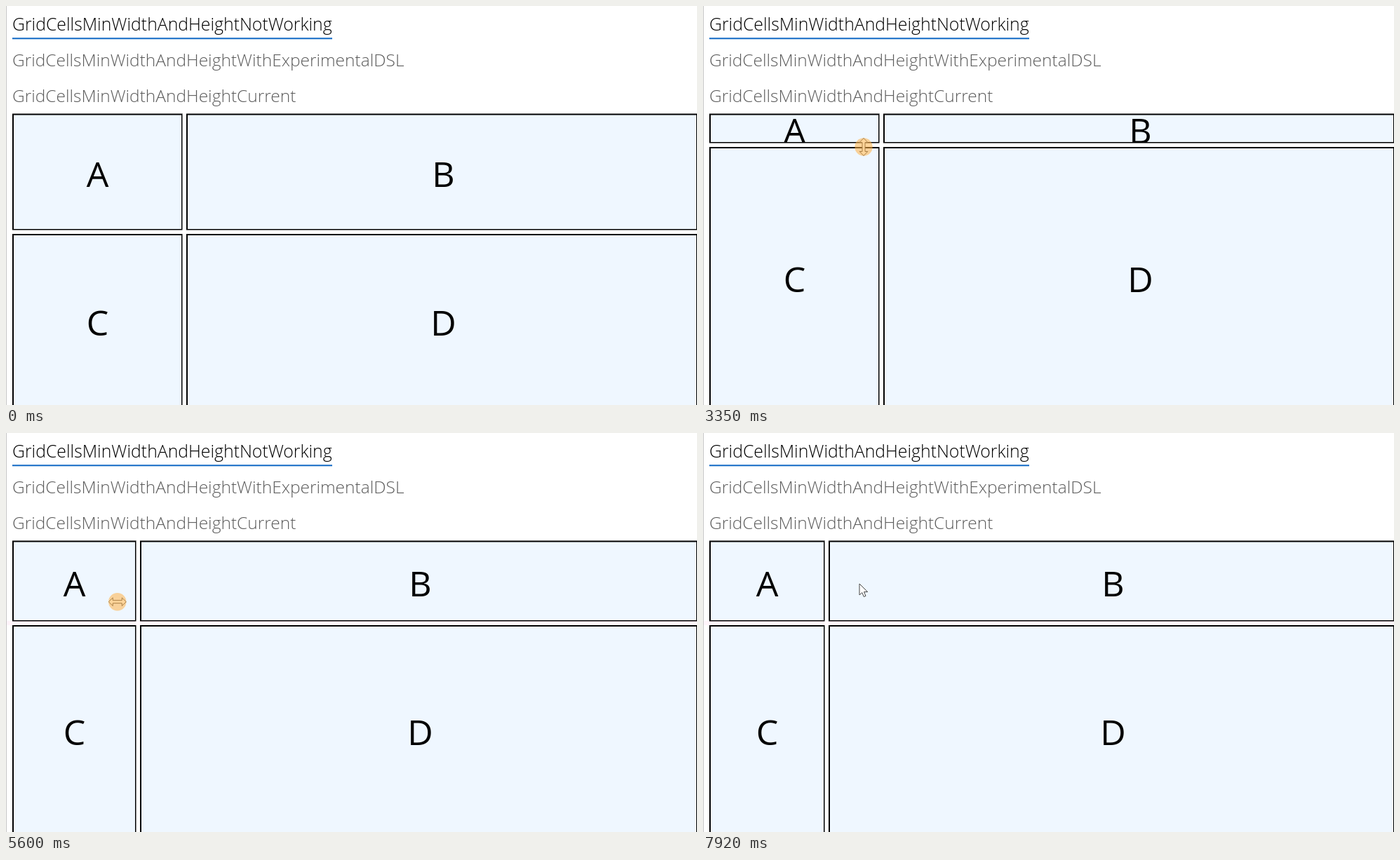
Write an HTML page that moves like this. It is 985 by 569 pixels and loops after 7.99 s.

```html
<!DOCTYPE html>
<html lang="en">
<head>
<meta charset="utf-8">
<title>Grid cells</title>
<style>
  html, body { margin: 0; width: 100%; height: 100%; overflow: hidden; background: #fff; }
  svg { display: block; font-family: "Open Sans", "Noto Sans", sans-serif; }
  .tab { font-size: 24.5px; font-weight: 300; fill: #5c5c5c; }
  .tab.on { font-size: 24.8px; fill: #000; }
  .cell rect { fill: #eff7ff; stroke: #000; stroke-width: 2; }
  .cell text { font-size: 50px; text-anchor: middle; }
  .bar { fill: #fff; fill-opacity: .5; }
  .cursor { fill: #fff; stroke: #444; stroke-linejoin: round; }
</style>
</head>
<body>
<svg width="985" height="569" viewBox="0 0 985 569">
  <defs><clipPath id="pane"><rect x="0" y="144" width="985" height="425"/></clipPath></defs>
  <text class="tab on" x="9" y="35">GridCellsMinWidthAndHeightNotWorking</text>
  <rect x="9" y="45.3" width="456" height="2" fill="#0f67c4"/>
  <text class="tab" x="9" y="86">GridCellsMinWidthAndHeightWithExperimentalDSL</text>
  <text class="tab" x="9" y="137">GridCellsMinWidthAndHeightCurrent</text>
  <g id="grid" clip-path="url(#pane)"></g>
  <rect width="1" height="569" fill="#c6c6c6"/>
  <g id="mouse">
    <path id="shape" class="cursor"/>
    <circle id="press" r="12.7" fill="#ffb347" fill-opacity=".55"/>
  </g>
</svg>
<script>
const LOOP = 7990, LAG = 70;
const LEFT = 9, TOP = 153.5, RIGHT = 986, BOTTOM = 700, GAP = 5;
const MIN_W = 36, MIN_H = 72;
const ROW_DRAG = [1970, 3950], COL_DRAG = [5250, 7655];

const ARROW = "M0 0V16L3.8 12.6L6.3 18.5L9 17.4L6.5 11.6H11.7Z";
const RESIZE = "M0-12.5L5.8-6.5H2V6.5H5.8L0 12.5L-5.8 6.5H-2V-6.5H-5.8Z";

// Eased mouse moves: from and to time, end point, sideways bow
const moves = [
  [120, 720, 252, 299],
  [720, 940, 231, 333],
  [1080, 1640, 237, 320],
  [2045, 2860, 239, 139, 6],
  [2900, 2990, 239, 133],
  [3100, 3280, 229, 201],
  [3400, 3900, 231, 274],
  [3960, 4450, 263, 236],
  [4710, 4920, 255, 236],
  [5250, 6150, -30, 250],
  [6400, 6760, 172, 268],
  [6785, 7120, -45, 262],
  [7170, 7650, 177, 236],
  [7660, 7920, 223, 215]
];

const $ = id => document.getElementById(id);
const clamp = (v, lo, hi) => Math.max(lo, Math.min(hi, v));
const within = (t, [from, to]) => t >= from && t < to;
const ease = p => p * p * (3 - 2 * p);

function set(el, attrs) {
  for (const key in attrs) el.setAttribute(key, attrs[key]);
}

function add(parent, tag, cls = "") {
  const el = document.createElementNS("http://www.w3.org/2000/svg", tag);
  el.setAttribute("class", cls);
  return parent.appendChild(el);
}

const cells = [..."ABCD"].map(letter => {
  const g = add($("grid"), "g", "cell");
  const cell = { box: add(g, "rect"), label: add(g, "text") };
  cell.label.textContent = letter;
  return cell;
});
const hBar = add($("grid"), "rect", "bar");
const vBar = add($("grid"), "rect", "bar");

function mouseAt(t) {
  let x = 874, y = 540;
  for (const [from, to, endX, endY, bow = 0] of moves) {
    const p = ease(clamp((t - from) / (to - from), 0, 1));
    x += (endX - x) * p + bow * Math.sin(Math.PI * p);
    y += (endY - y) * p;
  }
  return { x, y };
}

// While dragged, a splitter trails the mouse and stops at zero size
function splitAt(t) {
  const trail = drag => mouseAt(clamp(t - LAG, ...drag));
  return {
    x: clamp(trail(COL_DRAG).x + 2, LEFT + GAP, RIGHT),
    y: t < ROW_DRAG[0] + 2 * LAG ? 325 : Math.max(trail(ROW_DRAG).y, TOP + GAP)
  };
}

// An empty span falls back to the natural size, centred on its start
function span(start, size, natural) {
  return size > 0 ? [start, size] : [start - natural / 2, natural];
}

function drawGrid(t) {
  const { x, y } = splitAt(t);
  const w = x - GAP - LEFT, h = y - GAP - TOP;
  const cols = [span(LEFT, w, MIN_W), [x, RIGHT - x]];
  const rows = [span(TOP, h, MIN_H), [y, BOTTOM - y]];
  const mids = [LEFT + w / 2, x / 2 + 495];
  const bases = [y / 2 + 95.5, y / 2 + 307.8];
  cells.forEach(({ box, label }, i) => {
    const [left, width] = cols[i % 2], [top, height] = rows[i >> 1];
    set(box, { x: left + 1, y: top + 1, width: width - 2, height: height - 2 });
    set(label, { x: mids[i % 2], y: bases[i >> 1] });
  });
  set(hBar, { x: 0, y: y - GAP - 1, width: 985, height: GAP + 1 });
  set(vBar, { x: x - GAP - 1, y: TOP, width: GAP + 1, height: BOTTOM - TOP });
  hBar.style.fill = t < ROW_DRAG[1] ? "#fff" : "#ffeaf6";
}

function drawMouse(t) {
  const { x, y } = mouseAt(t);
  const tall = within(t, [1400, 4020]), wide = within(t, [4800, COL_DRAG[1]]);
  const pressed = within(t, ROW_DRAG) || within(t, COL_DRAG);
  set($("mouse"), { transform: `translate(${x} ${y})` });
  set($("shape"), { d: tall || wide ? RESIZE : ARROW, transform: wide ? "rotate(90)" : "" });
  $("mouse").style.display = t < 120 ? "none" : "";
  $("press").style.display = pressed ? "" : "none";
}

function frame(now) {
  const t = now % LOOP;
  drawGrid(t);
  drawMouse(t);
  requestAnimationFrame(frame);
}
frame(0);
</script>
</body>
</html>
```
